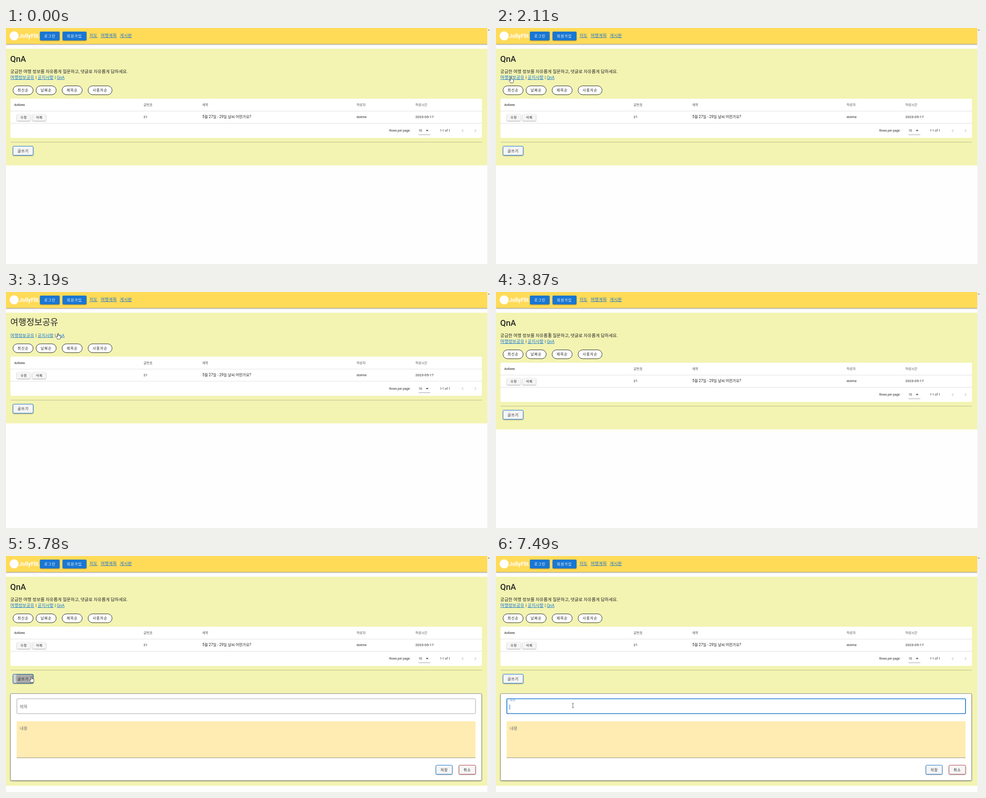
Write an HTML page that moves like this. It is 1070 px wide and 524 px high and loops after 8000 ms.

```html
<!DOCTYPE html>
<html lang="ko">
<head>
<meta charset="utf-8">
<title>QnA</title>
<style>
html, body { margin: 0; width: 100%; height: 100%; overflow: hidden; background: #fefefe; }
svg { display: block; width: 1070px; height: 524px; font-family: Roboto, 'Noto Sans CJK KR', 'Noto Sans CJK JP', sans-serif; }
text { fill: #262626; white-space: pre; }
.link { fill: #1976d2; text-decoration: underline; }
.head { fill: #555; }
.raised { filter: drop-shadow(0 1px .8px rgba(0, 0, 0, .38)); }
.bar { filter: drop-shadow(0 1.2px 1.3px rgba(0, 0, 0, .5)); }
</style>
</head>
<body>
<svg id="stage" viewBox="0 0 1070 524"></svg>
<script>
const text = (x, y, size, str, attrs = '') =>
  `<text x="${x}" y="${y}" font-size="${size}" ${attrs}>${str}</text>`;
const rect = (x, y, w, h, fill, attrs = '') =>
  `<rect x="${x}" y="${y}" width="${w}" height="${h}" fill="${fill}" ${attrs}/>`;
const line = (x, y, w, color) => rect(x, y, w, 1, color);
const link = (x, y, str, size = 9.62) => text(x, y, size, str, 'class="link"');

const pill = (x, w, str) =>
  rect(x + .5, 128.5, w - 1, 19.6, '#fff', 'rx="9.8" stroke="#222"') +
  text(x + 10.4, 141.4, 8, str, 'letter-spacing=".95"');

const smallButton = (x, str) =>
  rect(x, 191, 30, 15, '#f5f5f5', 'rx="2" class="raised"') +
  text(x + 8, 201, 7.2, str, 'letter-spacing=".5"');

const outlined = (x, y, w, color, str) =>
  rect(x + .5, y + .5, w - 1, 20, '#f5f5f5', `rx="2" stroke="${color}" class="raised"`) +
  text(x + 10.4, y + 13.6, 8, str, 'letter-spacing=".95"');

const navButton = (x, w, str) =>
  rect(x, 8, w, 19.5, '#1976d2', 'rx="2" class="raised"') +
  text(x + 9.6, 20.6, 8, str, 'letter-spacing=".95" font-weight="500" style="fill:#fff"');

const navBar = x => text(x, 19.5, 9, '|', 'style="fill:#fff" opacity=".7"');

const header =
  rect(0, -4, 1064, 39.6, '#ffdb58', 'class="bar"') +
  '<circle cx="18" cy="17.5" r="10" fill="#fff"/>' +
  text(29, 21.5, 12, 'JollyFlit.', 'font-weight="700" style="fill:#fff"') +
  navButton(75, 43.5, '로그인') + navButton(125, 53, '회원가입') +
  [120.5, 180, 205, 247.5].map(navBar).join('') +
  link(184.5, 20, '지도') + link(209.2, 20, '여행계획') + link(251.6, 20, '게시판');

const columns = [[304, '글번호', '21'], [434, '제목', '5월 27일 - 29일 날씨 어떤가요?'],
  [775, '작성자', 'dolme'], [905, '작성시간', '2023-05-17']];

const table =
  rect(10, 157, 1042, 87, '#fff', 'rx="2"') +
  rect(10, 184, 1042, 27, '#eee', 'id="rowHover"') +
  line(10, 184, 1042, '#e0e0e0') + line(10, 211, 1042, '#e0e0e0') +
  text(18.3, 173, 6.86, 'Actions', 'class="head" font-weight="700"') +
  columns.map(([x, name, value]) =>
    text(x, 173, 7.2, name, 'class="head" font-weight="500"') +
    text(x, 200.4, /[가-힣]/.test(value) ? 8.25 : 8, value)).join('') +
  smallButton(24, '수정') + smallButton(58.3, '삭제') +
  text(847.3, 230.4, 6.86, 'Rows per page:') + text(912, 230.4, 6.86, '10') +
  text(959, 230.4, 6.86, '1-1 of 1') +
  '<path d="M928 226.6h6l-3 3z" fill="#444"/>' + line(912, 236.5, 26, '#999') +
  '<path d="M1011 225l-3 3 3 3M1036 225l3 3-3 3" fill="none" stroke="#aaa"/>';

const board =
  link(9.6, 113, '여행정보공유') + text(65.6, 113, 9.2, '|') +
  link(69.8, 113, '공지사항') + text(107.8, 113, 9.2, '|') + link(112.2, 113, 'QnA', 9.14) +
  pill(15, 45.5, '최신순') + pill(66, 45.5, '날짜순') + pill(123.5, 45.5, '제목순') + pill(181, 54, '사용자순') +
  table + line(10, 253, 1042, '#b9ba90') +
  outlined(15, 262, 45.5, '#1976d2', '글쓰기') +
  `<g clip-path="url(#writeClip)">${rect(15, 262, 46, 21, '#000', 'id="writeHover"')}
   <circle id="ripple" cx="48" cy="272"/></g>`;

const form =
  rect(10, 305.5, 1041.5, 193, '#fff', 'rx="2" stroke="#8a8a8a" class="raised"') +
  rect(24, 317, 1014, 33, 'none', 'id="field" rx="2"') +
  `<g clip-path="url(#labelClip)">${text(30, 337.5, 9.6, '제목', 'id="label"')}</g>` +
  rect(30, 330, 1, 11, '#1976d2', 'id="caret"') +
  rect(23.5, 367, 1014.5, 81, '#ffecb3', 'rx="2"') + line(23.5, 447.5, 1014.5, '#8f8770') +
  text(30, 385.6, 9.6, '내용', 'style="fill:#777"') +
  outlined(950, 464, 37, '#1976d2', '저장') + outlined(1001, 464, 37.5, '#b8434f', '취소');

const cursors =
  `<g id="arrow"><path d="M0 0V10.2L2.4 8.1 4 11.6 5.6 10.9 4.1 7.5H7.2Z" fill="#fff" stroke="#222" stroke-width=".8"/></g>
   <g id="hand"><path d="M-1 7V1Q-1-.2 0-.2T1 1V4.6Q2 4 2.8 5 3.8 4.5 4.4 5.5 5.7 5.3 5.7 6.6V9Q5.5 11 4.4 12.7H-1.2Q-2 10.5-3.7 8.4-4.2 7-3 6.7-1.8 6.8-1 8Z" fill="#fff" stroke="#222" stroke-width=".8"/></g>
   <g id="beam"><path d="M-2-5H-.5L0-4.5.5-5H2M0-4.5V4.5M-2 5H-.5L0 4.5.5 5H2" fill="none" stroke="#444" stroke-width=".9"/></g>`;

const $ = id => document.getElementById(id);
$('stage').innerHTML =
  `<defs><clipPath id="writeClip"><rect x="15" y="262" width="46" height="21" rx="2"/></clipPath>
   <clipPath id="labelClip"><rect x="24" y="318.6" width="60" height="30"/></clipPath></defs>` +
  rect(0, 46, 1064, 259, '#f3f4b2', 'id="section"') + header +
  text(9.3, 74.6, 18.3, 'QnA', 'id="qnaTitle" font-weight="500"') +
  text(9.6, 74.2, 19.2, '여행정보공유', 'id="infoTitle"') +
  text(9.6, 99.8, 9.62, '궁금한 여행 정보를 자유롭게 질문하고, 댓글로 자유롭게 답하세요.', 'id="intro"') +
  `<g id="board">${board}</g><g id="form">${form}</g>` +
  rect(1064, 0, 6, 524, '#f1f1f1') + '<path d="M1065.2 5.5h4l-2-2.5z" fill="#777"/>' + cursors;

// start, end, steps, end point, optional control point
const moves = [
  [190, 960, 12, [200, 193], [520, 300]],
  [1030, 1220, 3, [153, 170]],
  [1290, 1770, 7, [33, 117], [80, 130]],
  [1840, 1910, 2, [33, 109]],
  [2450, 2580, 3, [40, 109]],
  [2650, 3190, 8, [115, 92], [85, 106]],
  [3720, 3720, 1, [116, 90]],
  [3870, 3870, 1, [118, 96]],
  [4330, 4680, 6, [322, 185], [290, 110]],
  [4750, 5080, 6, [96, 258], [325, 245]],
  [5150, 5430, 5, [56, 268]],
  [5860, 6270, 6, [169, 333], [110, 310]],
  [6350, 6350, 1, [170, 332]]
];
const shapes = [[190, 'arrow'], [1840, 'hand'], [2170, 'arrow'], [3120, 'hand'], [3870, 'beam'],
  [4400, 'arrow'], [5290, 'hand'], [5930, 'arrow'], [6130, 'beam']];

function cursorAt(t) {
  let from = [1052, 530];
  for (const [start, end, steps, to, ctrl] of moves) {
    if (t < start) break;
    const step = Math.floor((t - start) / (end - start || 1) * (steps - 1) + 1e-6);
    const u = Math.min(1, (step + 1) / steps);
    from = from.map((a, i) => {
      const mid = ctrl ? ctrl[i] : (a + to[i]) / 2;
      return (1 - u) ** 2 * a + 2 * u * (1 - u) * mid + u * u * to[i];
    });
  }
  return from;
}

const show = (id, on) => $(id).setAttribute('visibility', on ? 'visible' : 'hidden');
const set = (id, attrs) => { for (const k in attrs) $(id).setAttribute(k, attrs[k]); };
const ramp = (t, a, b) => Math.max(0, Math.min(1, (t - a) / (b - a)));

function draw(t) {
  const info = t >= 2170 && t < 3870, writing = t >= 5780, focused = t >= 6420;
  show('qnaTitle', !info);
  show('intro', !info);
  show('infoTitle', info);
  set('board', { transform: `translate(0 ${info ? -13.4 : 0})` });
  set('section', { height: writing ? 464 : info ? 245.6 : 259 });
  show('rowHover', t >= 1030 && t < 1150);

  set('writeHover', { opacity: .14 * ramp(t, 5220, 5430) * (1 - ramp(t, 5860, 6060)) });
  set('ripple', { r: 8 + 26 * ramp(t, 5570, 5870), opacity: t < 5570 ? 0 : .22 * (1 - ramp(t, 5750, 6000)) });

  $('form').style.display = writing ? '' : 'none';
  const hovered = t >= 6060;
  set('field', { stroke: focused ? '#1976d2' : hovered ? '#555' : '#9e9e9e', 'stroke-width': focused ? 1.7 : 1 });
  const lift = ramp(t, 6400, 6640);
  set('label', { y: 337.5 - 15.2 * lift, 'font-size': 9.6 - 2.4 * lift });
  $('label').style.fill = focused ? '#5b8fc4' : '#777';
  $('caret').style.display = focused && (t < 6960 || t >= 7490) ? '' : 'none';

  const current = shapes.filter(([start]) => t >= start).pop();
  for (const id of ['arrow', 'hand', 'beam']) show(id, current && current[1] === id);
  if (current) set(current[1], { transform: `translate(${cursorAt(t)})` });
}

const began = performance.now();
function tick() {
  draw((performance.now() - began) % 8000);
  requestAnimationFrame(tick);
}
tick();
</script>
</body>
</html>
```
